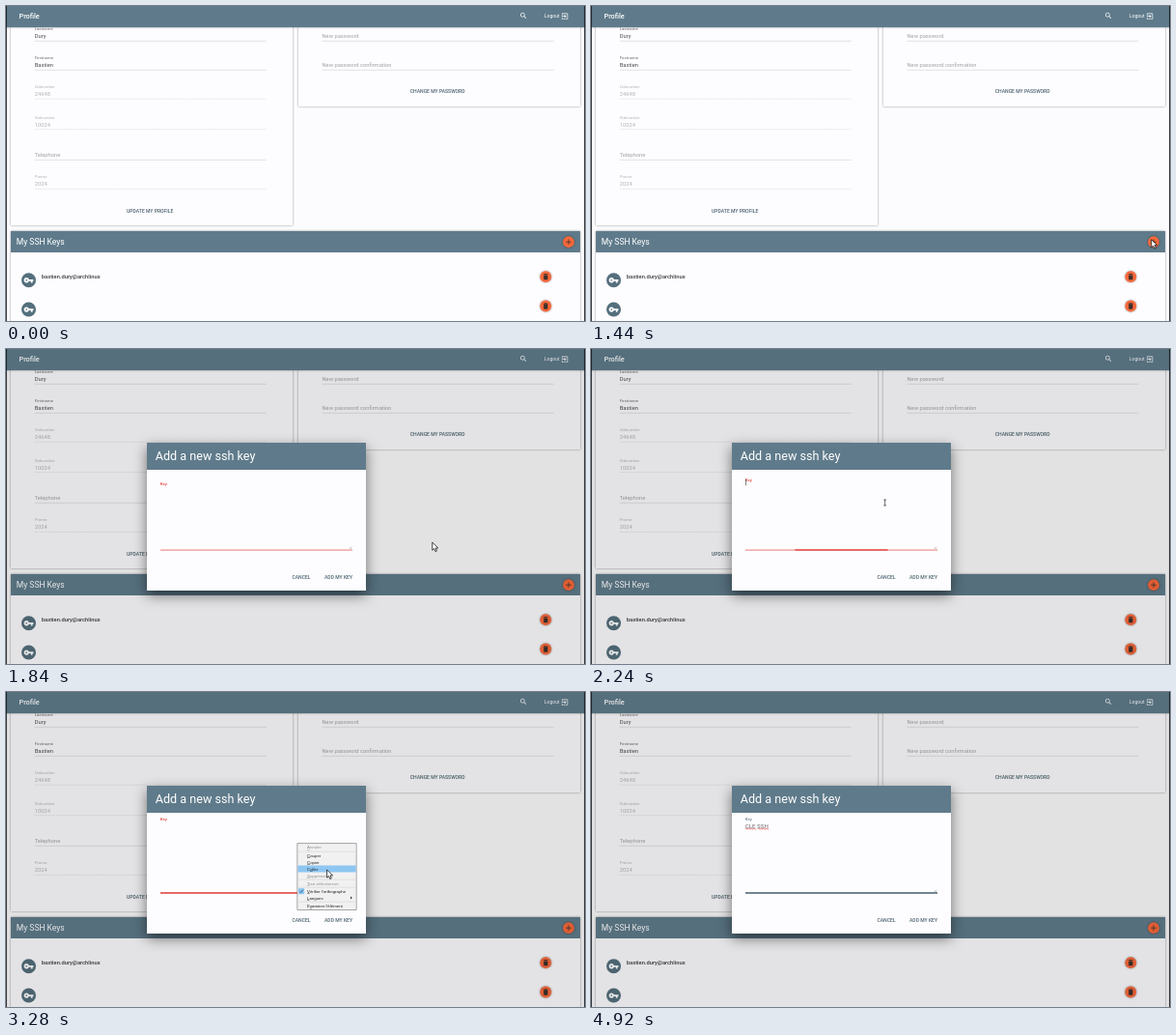
An HTML page that plays this animation: 600x326 px, repeating every 5 s.

```html
<!DOCTYPE html>
<html lang="en">
<head>
<meta charset="utf-8">
<title>Profile</title>
<style>
html, body { margin: 0; width: 100%; height: 100%; overflow: hidden; background: #fcfbfd; }
svg { display: block; width: 100vw; height: 100vh; }
text { font: 5.78px Roboto, sans-serif; fill: #4b4b4d; white-space: pre; }
.bar { fill: #5f7b8b; }
.paper { fill: #fdfcfe; }
.card { filter: drop-shadow(0 .8px 1.1px rgba(0,0,0,.42)); }
.dialog { filter: drop-shadow(0 5px 7px rgba(0,0,0,.5)); }
.small { font-size: 4.3px; fill: #68686a; }
.hint { fill: #a2a2a4; }
.off, .off.small { fill: #b4b4b6; }
.button { font-size: 5.05px; font-weight: 500; fill: #4d6572; }
.white { fill: #fff; }
.strong { font-weight: 500; fill: #3c3c3e; }
.rule { stroke: #cfcfd1; stroke-width: .6; }
.dots { stroke: #c8c8ca; stroke-width: .6; stroke-dasharray: .8 .8; }
.accent { fill: #f7683a; }
.glyph { fill: #3b302d; }
.spell { fill: none; stroke: #e23b35; stroke-width: .7; }
#menu text { font: 4.35px "Liberation Sans", Arial, sans-serif; fill: #1b1b1b; }
#menu text.gray { fill: #8c8c8c; }
#menu tspan { text-decoration: underline; text-decoration-thickness: .4px; }
</style>
</head>
<body>
<svg viewBox="0 0 600 326" preserveAspectRatio="none">
  <defs>
    <path id="key" d="M12.65 10C11.83 7.67 9.61 6 7 6c-3.31 0-6 2.69-6 6s2.69 6 6 6c2.61 0 4.83-1.67 5.65-4H17v4h4v-4h2v-4H12.65zM7 14c-1.1 0-2-.9-2-2s.9-2 2-2 2 .9 2 2-.9 2-2 2z"/>
    <path id="trash" d="M6 19c0 1.1.9 2 2 2h8c1.1 0 2-.9 2-2V7H6v12zM19 4h-3.500l-1-1h-5l-1 1H5v2h14V4z"/>
    <g id="sshRow">
      <circle cx="23.500" cy="3.500" r="7.500" fill="#546f7d"/>
      <use href="#key" class="white" transform="translate(18.100 -1.800) scale(.45)"/>
      <circle cx="559.300" cy="0" r="5.900" class="accent card"/>
      <use href="#trash" class="glyph" transform="translate(555.100 -4.200) scale(.35)"/>
    </g>
  </defs>

  <rect width="600" height="326" fill="#fcfbfd"/>
  <rect class="paper card" x="5" y="-10" width="292" height="237"/>
  <rect class="paper card" x="303" y="-10" width="292" height="114"/>
  <g id="fields"></g>
  <text class="button" x="125" y="213.600">UPDATE MY PROFILE</text>
  <text class="button" x="418.800" y="90.400">CHANGE MY PASSWORD</text>

  <rect class="paper card" x="5" y="233" width="590" height="110"/>
  <rect class="bar" x="5" y="233" width="590" height="22"/>
  <text class="white" x="10.800" y="247" style="font-size:8.500px">My SSH Keys</text>
  <circle class="accent card" cx="583" cy="244.200" r="5.900"/>
  <path d="M580.200 244.200h5.600M583 241.400v5.600" stroke="#3b302d" stroke-width=".8"/>
  <use href="#sshRow" y="280.200"/>
  <use href="#sshRow" y="310.500"/>
  <text class="strong" x="36.800" y="282.200">bastien.dury@archlinux</text>

  <rect class="bar card" width="600" height="22"/>
  <text class="white" x="13.500" y="13.200" style="font-size:7.300px;font-weight:500">Profile</text>
  <path class="white" transform="translate(532 5.800) scale(.355)" d="M15.500 14h-.79l-.28-.27C15.410 12.590 16 11.110 16 9.500 16 5.910 13.090 3 9.500 3S3 5.910 3 9.500 5.910 16 9.500 16c1.610 0 3.090-.59 4.230-1.570l.27.28v.79l5 4.990L20.490 19l-4.990-5zm-6 0C7.010 14 5 11.990 5 9.500S7.010 5 9.500 5 14 7.010 14 9.500 11.990 14 9.500 14z"/>
  <text class="white" x="557.800" y="12.400" style="font-size:5.100px">Logout</text>
  <path class="white" transform="translate(574.800 6.400) scale(.355)" d="M10.090 15.590L11.500 17l5-5-5-5-1.410 1.410L12.670 11H3v2h9.670l-2.580 2.590zM19 3H5c-1.110 0-2 .9-2 2v4h2V5h14v14H5v-4H3v4c0 1.100.89 2 2 2h14c1.100 0 2-.9 2-2V5c0-1.100-.9-2-2-2z"/>
  <path d="M.4 0v326M599.600 0v326" stroke="#16191b" stroke-width=".9"/>

  <g id="modal">
    <rect width="600" height="326" fill="#000" opacity=".1"/>
    <rect class="paper dialog" x="146" y="97" width="227" height="153"/>
    <rect class="bar" x="146" y="97" width="227" height="28"/>
    <text class="white" x="154.800" y="115.400" style="font-size:12.600px">Add a new ssh key</text>
    <text id="label" class="small" x="159.800">Key</text>
    <rect id="line" x="160" y="207.700" width="199" height=".7"/>
    <rect id="ink" y="207.300" height="1.300"/>
    <path d="M355.500 207l2.500-2.500M357 207l1-1" stroke="#8d8d8f" stroke-width=".5"/>
    <g id="pasted">
      <text x="159.800" y="140.500" style="font-size:6.150px;fill:#6b6b6d">CLE SSH</text>
      <path class="spell" d="M160 141.600q.7-1 1.400 0t1.400 0 1.400 0 1.400 0 1.400 0 1.400 0 1.400 0 1.400 0"/>
      <path class="spell" id="spell2" d="M173 141.600q.7-1 1.400 0t1.400 0 1.400 0 1.400 0 1.400 0 1.400 0 1.400 0 1.400 0"/>
    </g>
    <rect id="caret" y="134.800" width=".6" height="6.500" fill="#333"/>
    <text class="button" x="296.400" y="237.700">CANCEL</text>
    <text class="button" x="330" y="237.700">ADD MY KEY</text>
    <g id="menu">
      <rect x="302" y="156.800" width="61" height="68.500" fill="#f2f1f2" stroke="#98989a" stroke-width=".6" style="filter:drop-shadow(.8px .8px .7px rgba(0,0,0,.5))"/>
      <rect id="hover" x="302.300" width="60.400" height="7" fill="#8ec6f2"/>
      <path d="M303 165.200h59M303 194.100h59M303 202.200h59M303 217.200h59" stroke="#cbcbcd" stroke-width=".5"/>
      <rect x="303" y="203.200" width="6.200" height="6" fill="#8ec6f2"/>
      <path d="M304.500 206.200l1.200 1.300 2-2.800" fill="none" stroke="#23415a" stroke-width=".7"/>
      <path d="M357 211.500l1.800 1.500-1.800 1.500z" fill="#333"/>
    </g>
  </g>
  <path id="arrow" d="M0 0v8.200l1.900-1.700 1.300 3 1.500-.7-1.300-2.900h2.600z" fill="#fff" stroke="#161616" stroke-width=".8"/>
  <path id="beam" d="M-1.400-3h2.800M-1.400 3h2.800M0-3v6" fill="none" stroke="#333" stroke-width=".7"/>
</svg>
<script>
const $ = id => document.getElementById(id);
const show = (id, on) => $(id).style.display = on ? '' : 'none';
const set = (id, attrs) => { for (const k in attrs) $(id).setAttribute(k, attrs[k]); };
const text = (x, y, cls, s) => `<text x="${x}" y="${y}" class="${cls}">${s}</text>`;

// Form fields: x, underline y, label, value, disabled
const fields = [
  [29.7, 36.3, 'Lastname', 'Dury'],
  [29.7, 66.3, 'Firstname', 'Bastien'],
  [29.7, 96.2, 'Uidnumber', '24648', true],
  [29.7, 127.6, 'Gidnumber', '10024', true],
  [29.7, 159.3, '', 'Telephone'],
  [29.7, 189.4, 'Promo', '2024', true],
  [327.5, 36.3, '', 'New password'],
  [327.5, 66.3, '', 'New password confirmation']
];
$('fields').innerHTML = fields.map(([x, y, label, value, off]) => {
  const tone = off ? 'off' : label ? '' : 'hint';
  return text(x, y - 11, 'small ' + tone, label) + text(x, y - 3.1, tone, value) +
    `<path class="${off ? 'dots' : 'rule'}" d="M${x} ${y}h240"/>`;
}).join('');

// Menu entries: centre y, text, underlined letter, disabled
const entries = [
  [160.7, 'Annuler', 0, true], [169, 'Couper', 0], [176, 'Copier', 0],
  [183, 'Coller', 1], [190, 'Supprimer', 0, true], [198, 'Tout sélectionner', 0, true],
  [206, "Vérifier l'orthographe", 0], [213, 'Langues', 0], [221.3, "Examiner l'élément", 1]
];
$('menu').insertAdjacentHTML('beforeend', entries.map(([y, s, i, off]) =>
  text(312, y + 1.5, off ? 'gray' : '', s.slice(0, i) + `<tspan>${s[i]}</tspan>` + s.slice(i + 1))).join(''));

const LOOP = 5000, OPEN = 1480, FOCUS = 2180, MENU = 2940, CLOSE = 3760, PASTE = 3800, LEAVE = 4200;
const path = [ // time, x, y
  [240, 606, 332], [560, 580.7, 241.7], [1600, 580.7, 241.7], [2080, 304.6, 159],
  [2960, 304.6, 159], [3240, 332.6, 184], [LEAVE, 332.6, 184], [4640, -8, 150]
];

function pointer(t) {
  const i = path.findIndex(p => p[0] > t);
  if (i === 0) return path[0].slice(1);
  if (i < 0) return path.at(-1).slice(1);
  const [t0, x0, y0] = path[i - 1], [t1, x1, y1] = path[i];
  const u = (t - t0) / (t1 - t0), e = u * u * (3 - 2 * u);
  return [x0 + (x1 - x0) * e, y0 + (y1 - y0) * e];
}

// cubic-bezier(.25, .8, .25, 1)
function ease(x) {
  if (x <= 0 || x >= 1) return x <= 0 ? 0 : 1;
  const curve = (s, a, b) => 3 * (1 - s) ** 2 * s * a + 3 * (1 - s) * s * s * b + s ** 3;
  let lo = 0, hi = 1;
  for (let i = 0; i < 16; i++) {
    const mid = (lo + hi) / 2;
    if (curve(mid, .25, .25) < x) lo = mid; else hi = mid;
  }
  return curve(lo, .8, 1);
}

function draw(t) {
  const [x, y] = pointer(t), pasted = t >= PASTE, menu = t >= MENU && t < CLOSE;
  show('modal', t >= OPEN);

  const grow = ease((t - FOCUS) / 400), tone = pasted ? '#4b6471' : '#e2423c';
  set('label', { y: 140.5 - 7.2 * grow, style: `fill:${tone};font-weight:${pasted ? 400 : 500}` });
  set('line', { fill: tone });
  set('ink', { x: 259.5 - 99.5 * grow, width: 199 * grow, fill: tone });

  show('pasted', pasted);
  show('spell2', t >= 4640);
  const since = t - (pasted ? PASTE : FOCUS);
  show('caret', since >= 0 && !menu && since % 1200 < 600);
  set('caret', { x: pasted ? 184.7 : 160 });

  show('menu', menu);
  const row = entries.find(e => !e[3] && Math.abs(e[0] - y) <= 3.5);
  show('hover', row);
  if (row) set('hover', { y: row[0] - 3.5 });

  const inField = x > 160 && x < 359 && y > 130 && y < 208;
  const beam = inField && t >= OPEN && (t < MENU || t > LEAVE);
  show('beam', beam);
  show('arrow', !beam);
  set(beam ? 'beam' : 'arrow', { transform: `translate(${x} ${y})` });
}

const start = performance.now();
(function tick() {
  draw((performance.now() - start) % LOOP);
  requestAnimationFrame(tick);
})();
</script>
</body>
</html>
```
